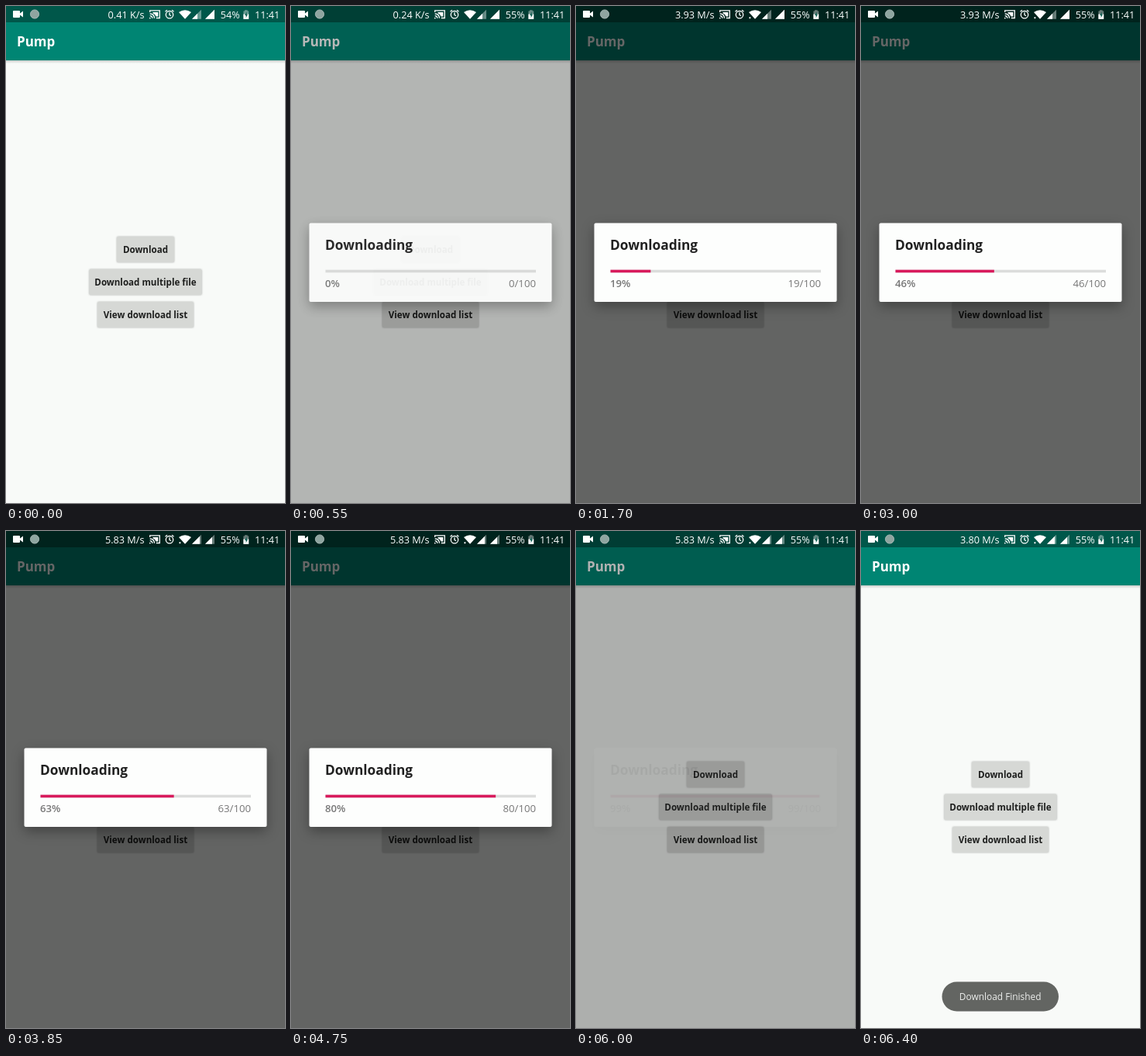
Animation of 360x640 px, one loop 6500 ms. Source, as an HTML page:

```html
<!DOCTYPE html>
<html lang="en">
<head>
<meta charset="utf-8">
<title>Download progress</title>
<style>
  html, body { margin: 0; width: 100%; height: 100%; overflow: hidden; background: #f8faf8; }
  svg { display: block; width: 360px; height: 640px; font-family: "Open Sans", "Noto Sans", sans-serif; }
  .bold { font-weight: 700; }
  .end { text-anchor: end; }
  .mid { text-anchor: middle; }
  .status { fill: #fff; font-size: 12.7px; font-weight: 500; }
  .button rect { fill: #d6d8d5; filter: drop-shadow(0 .6px .8px rgba(0, 0, 0, .3)); }
  .button text { fill: #1e1f1e; font-size: 11.6px; }
  #panel { filter: drop-shadow(0 6px 8px rgba(0, 0, 0, .32)); }
  #dialog .label { font-size: 13.2px; fill: #777; }
  #percent { font-weight: 600; }
</style>
</head>
<body>
<svg viewBox="0 0 360 640">
  <defs>
    <linearGradient id="shade" x2="0" y2="1">
      <stop stop-color="#000" stop-opacity=".18"/>
      <stop offset="1" stop-color="#000" stop-opacity="0"/>
    </linearGradient>
  </defs>

  <rect width="360" height="640" fill="#f8faf8"/>
  <rect y="70" width="360" height="4" fill="url(#shade)"/>
  <rect width="360" height="70" fill="#008573"/>
  <rect width="360" height="21" fill="#00574a"/>
  <text class="bold" x="14" y="52" font-size="17" fill="#fff">Pump</text>
  <g class="button"><rect x="143" y="297" width="74" height="33" rx="1.5"/><text class="bold mid" x="180" y="318">Download</text></g>
  <g class="button"><rect x="107.5" y="339" width="145" height="33" rx="1.5"/><text class="bold mid" x="180" y="360">Download multiple file</text></g>
  <g class="button"><rect x="118" y="381" width="124" height="33" rx="1.5"/><text class="bold mid" x="180" y="402">View download list</text></g>

  <rect id="dim" width="360" height="640"/>

  <g id="dialog">
    <rect id="panel" x="23.5" y="279.5" width="313" height="101.5" rx="2" fill="#fdfefd"/>
    <text class="bold" x="44" y="314" font-size="17.3" fill="#212121">Downloading</text>
    <rect x="44.5" y="339.7" width="271.5" height="3.6" fill="#dcdddc"/>
    <rect id="bar" x="44.5" y="339.7" height="3.6" fill="#d81b5c"/>
    <text id="percent" class="label" x="44" y="362"></text>
    <text id="count" class="label end" x="316" y="362"></text>
  </g>

  <g id="toast">
    <rect x="104.5" y="580.5" width="150.5" height="38" rx="19" fill="#636562"/>
    <text class="mid" x="179.7" y="603.5" font-size="11.9" fill="#eceeec">Download Finished</text>
  </g>

  <!-- status bar -->
  <g fill="#fff">
    <path d="M10 6h7q1 0 1 1v2.5l4-3v8l-4-3V14q0 1-1 1h-7q-1 0-1-1V7q0-1 1-1z"/>
    <circle cx="37" cy="10.5" r="5.6" fill="#8fa5a0" stroke="#b5c3c0" stroke-width=".8"/>
    <g fill="none" stroke="#fff" stroke-width="1.3">
      <path d="M185.7 8V5.8h12.6v9.7h-4.5M185.7 10q5.5 0 5.8 5.8M185.7 12.6q3 0 3.2 3.2"/>
      <circle cx="211" cy="11.2" r="4.7"/>
      <path d="M211 8.3v3.2l2 1.3M205.5 7.3l2.5-2M216.5 7.3l-2.5-2"/>
    </g>
    <path d="M189.5 8h6.8v5.6h-2.8q-.8-3.2-4-4.4z"/>
    <circle cx="185.8" cy="15.6" r=".9"/>
    <path d="M223 8Q231 2.5 239 8L231 16.8z"/>
    <path id="traffic" d="M223.5 14.2h1.8v2h-1.8z"/>
    <path d="M240 16.8L252 4.8v12z" opacity=".4"/>
    <path id="signal1"/>
    <path d="M257 16.8L269 4.8v12z" opacity=".4"/>
    <path id="signal2"/>
    <path d="M308 5.2h3.6v1.2h1.6v10.4h-6.8V6.4h1.6z" opacity=".4"/>
    <path d="M306.4 10.5h6.8v6.3h-6.8z"/>
    <path d="M310.5 7.5l-2.4 4.4h1.5v3.3l2.4-4.5h-1.5z" fill="#00574a"/>
  </g>
  <text id="speed" class="status end" x="178.5" y="15.5"></text>
  <text id="battery" class="status end" x="301.8" y="15.5"></text>
  <text class="status end" x="353.3" y="15.5">11:41</text>
</svg>

<script>
const LOOP = 6500, STEP = 50, BAR = 271.5;
const FADE_IN = 450, FADE_OUT = 6000;
const progressKeys = [[750, 0], [1700, 19.1], [3000, 46.9], [4750, 80.9], [5750, 99.3]];
const speeds = [[0, "0.41 K/s"], [200, "0.24 K/s"], [1450, "3.93 M/s"], [3850, "5.83 M/s"], [6200, "3.80 M/s"]];

const $ = id => document.getElementById(id);
const ramp = (t, from, to) => Math.min(1, Math.max(0, (t - from) / (to - from)));
const easeOut = x => 1 - (1 - x) ** 2;

function progress(t) {
  let value = 0;
  for (let i = 1; i < progressKeys.length; i++) {
    const [t0, v0] = progressKeys[i - 1], [t1, v1] = progressKeys[i];
    value += (v1 - v0) * ramp(t, t0, t1);
  }
  return value;
}

// white part of a signal triangle, growing from its left corner
const signal = (x, w) => `M${x} 16.8l${w} ${-w}v${w}z`;

function draw(t) {
  const leaving = t >= FADE_OUT;
  const done = progress(t), whole = Math.floor(done + 1e-6);

  $("dim").style.opacity = leaving ? .3 * (1 - ramp(t, FADE_OUT, 6150)) : .6 * ramp(t, FADE_IN, 665);
  $("dialog").style.opacity = leaving ? .04 * (1 - ramp(t, FADE_OUT, 6050)) : easeOut(ramp(t, FADE_IN, 585));
  $("toast").style.opacity = ramp(t, 6150, 6400);

  $("bar").setAttribute("width", BAR * done / 100);
  $("percent").textContent = whole + "%";
  $("count").textContent = whole + "/100";

  $("speed").textContent = speeds.filter(([start]) => t >= start).pop()[1];
  $("battery").textContent = t < 200 ? "54%" : "55%";
  $("traffic").style.opacity = t < 1450 ? 0 : 1;
  $("signal1").setAttribute("d", signal(240, t < 3850 ? 7 : 10));
  $("signal2").setAttribute("d", signal(257, t < 3850 ? 12 : 9));
}

function tick() {
  const t = performance.now() % LOOP;
  draw(Math.min(6400, Math.floor(t / STEP) * STEP));
  requestAnimationFrame(tick);
}
tick();
</script>
</body>
</html>
```
